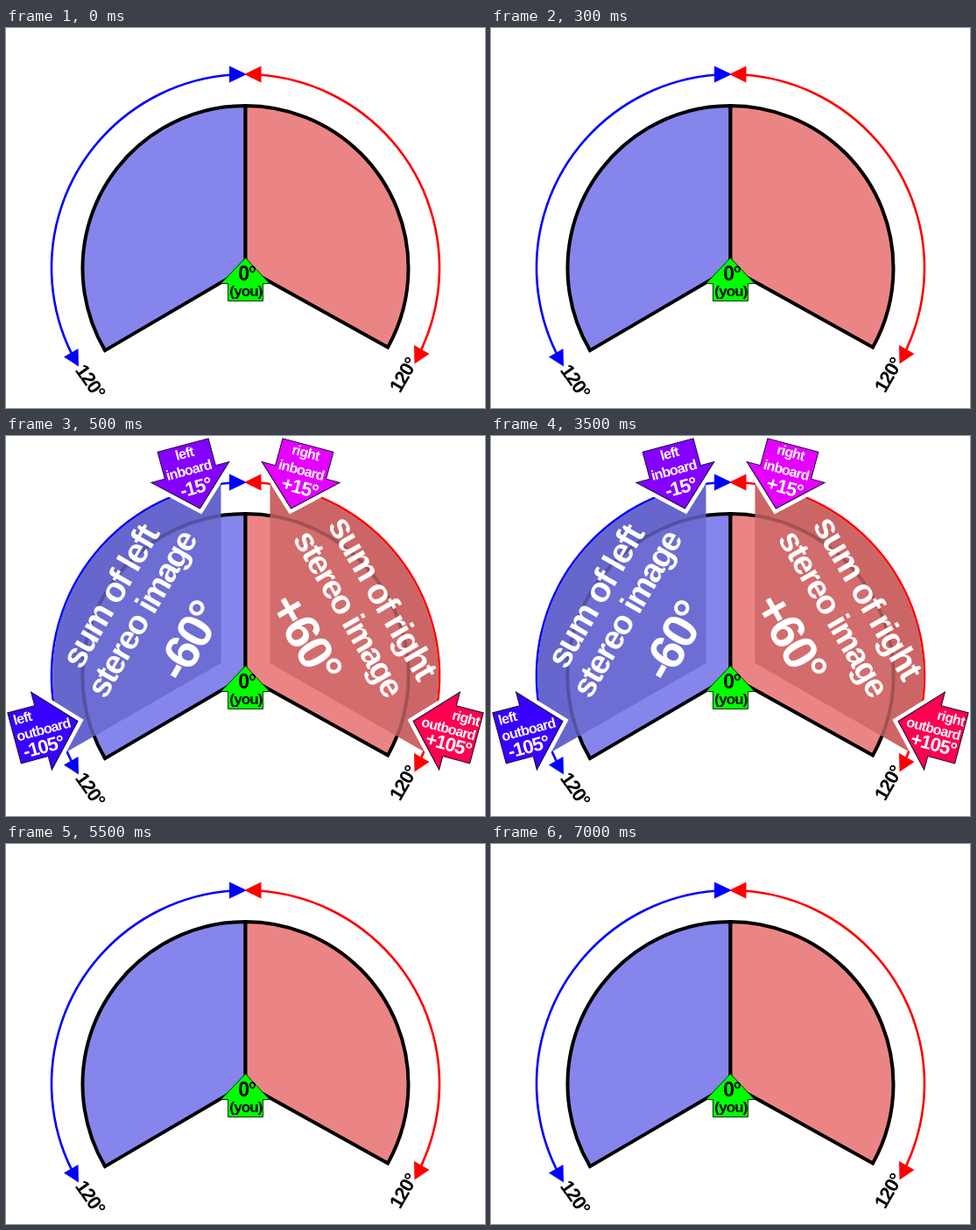
An HTML page with a canvas for the animation above (8 s loop, 547 px wide and 435 px high).

```html
<!DOCTYPE html>
<html lang="en">
<head>
<meta charset="utf-8">
<title>Stereo field</title>
<style>
html, body { margin: 0; width: 100%; height: 100%; overflow: hidden; background: #fff; }
canvas { display: block; }
</style>
</head>
<body>
<canvas id="stage" width="547" height="435"></canvas>
<script>
const ctx = document.getElementById('stage').getContext('2d');
const LOOP = 8000, SHOW = 500, HIDE = 5500;
const W = 547, H = 435, CX = 273.5, CY = 275;
const BLUE = '#00f', RED = '#f00';
const LEFT_FILL = '#8585eb', RIGHT_FILL = '#eb8585';
const rad = deg => deg * Math.PI / 180;

function path(points, close = true) {
  ctx.beginPath();
  points.forEach(([x, y]) => ctx.lineTo(x, y));
  if (close) ctx.closePath();
}

function fill(color) {
  ctx.fillStyle = color;
  ctx.fill();
}

function stroke(color, width) {
  ctx.strokeStyle = color;
  ctx.lineWidth = width;
  ctx.stroke();
}

function label(text, x, y, size, deg = 0, color = '#000') {
  ctx.save();
  ctx.translate(x, y);
  ctx.rotate(rad(deg));
  ctx.font = `bold ${size}px "Liberation Sans", Arial, sans-serif`;
  ctx.letterSpacing = `${-0.05 * size}px`;
  ctx.textAlign = 'center';
  ctx.textBaseline = 'middle';
  ctx.fillStyle = color;
  ctx.fillText(text, 0, 0);
  ctx.restore();
}

function sector(from, to, color) {
  ctx.beginPath();
  ctx.moveTo(CX, CY);
  ctx.arc(CX, CY, 186, rad(from), rad(to));
  ctx.closePath();
  fill(color);
  stroke('#000', 4);
}

function range(from, to, color, heads) {
  ctx.beginPath();
  ctx.arc(CX, 274.5, 221.5, rad(from), rad(to));
  stroke(color, 2.6);
  heads.forEach(points => {
    path(points);
    fill(color);
  });
}

function drawBase() {
  sector(149.6, 270, LEFT_FILL);
  sector(270, 389.1, RIGHT_FILL);
  range(153.8, 266, BLUE, [
    [[275, 53], [255, 43.5], [255, 62.5]],
    [[83, 387.5], [66, 376.5], [82.5, 367]]
  ]);
  range(274, 385, RED, [
    [[272, 53], [291.5, 43.5], [291.5, 62.5]],
    [[466.5, 384.5], [466, 363], [483.5, 373]]
  ]);
  label('120°', 95, 405, 22, 55);
  label('120°', 455, 398, 22, -60);
}

function drawListener() {
  path([[273.5, 263], [301, 292.5], [293.5, 292.5], [293.5, 312.5],
        [253.5, 312.5], [253.5, 292.5], [245.5, 292.5]]);
  fill('#0f0');
  stroke('#063800', 1);
  label('0°', 275, 283, 23);
  label('(you)', 274, 302, 17);
}

// Solid zone with the sector showing faintly through it.
function zone(color, sectorColor) {
  ctx.save();
  ctx.beginPath();
  ctx.arc(CX, 274.5, 220.5, 0, 2 * Math.PI);
  ctx.clip();
  path([[245.5, 260], [245.5, 50], [20, 50], [20, 390]]);
  fill(color);
  ctx.clip();
  ctx.globalAlpha = 0.22;
  sector(149.6, 270, sectorColor);
  ctx.restore();
}

// Block arrow with its tip at (x, y), pointing along deg.
function pointer(x, y, deg, color) {
  const length = 75, head = 43, wing = 46, half = 30;
  ctx.save();
  ctx.translate(x, y);
  ctx.rotate(rad(deg));
  path([[-head, -wing], [0, 0], [-head, wing]], false);
  stroke('#fff', 10);
  path([[0, 0], [-head, wing], [-head, half], [-length, half],
        [-length, -half], [-head, -half], [-head, -wing]]);
  fill(color);
  stroke('#101030', 1);
  ctx.restore();
}

function side(color, sectorColor, inboard, outboard) {
  zone(color, sectorColor);
  pointer(221.5, 83, 75, inboard);
  pointer(82, 326.5, -15, outboard);
}

function drawImages() {
  side('#6666cc', LEFT_FILL, '#8400ff', '#3a00ff');
  ctx.save();
  ctx.translate(W, 0);
  ctx.scale(-1, 1);
  side('#cc6666', RIGHT_FILL, '#e600ff', '#ff0050');
  ctx.restore();

  const white = (text, x, y, size, deg) => label(text, x, y, size, deg, '#fff');
  white('left', 204, 21, 16, -15);
  white('inboard', 209, 40, 16, -15);
  white('-15°', 217, 60, 22, -15);
  white('right', 342, 20, 16, 15);
  white('inboard', 337, 40, 16, 15);
  white('+15°', 335, 60, 22, 15);
  white('left', 19, 324, 16, -15);
  white('outboard', 43, 337, 16, -15);
  white('-105°', 43, 357, 22, -15);
  white('right', 525, 324, 16, 15);
  white('outboard', 505, 336, 16, 15);
  white('+105°', 505, 354, 22, 15);

  white('sum of left', 121, 185, 40, -60);
  white('stereo image', 157, 205, 38, -60);
  white('-60°', 212, 237, 56, -60);
  white('sum of right', 428, 186, 40, 60);
  white('stereo image', 389, 204, 38, 60);
  white('+60°', 339, 232, 56, 60);
}

function frame(now) {
  const t = now % LOOP;
  ctx.fillStyle = '#fff';
  ctx.fillRect(0, 0, W, H);
  drawBase();
  if (t >= SHOW && t < HIDE) drawImages();
  drawListener();
  requestAnimationFrame(frame);
}

frame(0);
</script>
</body>
</html>
```
